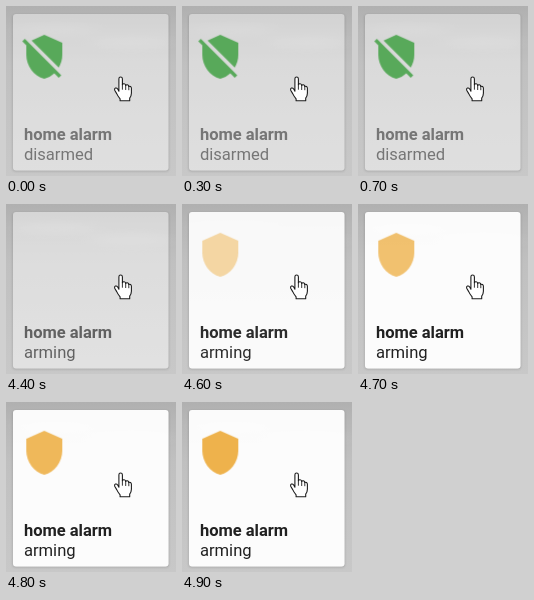
An HTML page that plays this animation: 170x170 px, repeating every 5000 ms.

```html
<!DOCTYPE html>
<html lang="en">
<head>
<meta charset="utf-8">
<title>Home alarm card</title>
<style>
  html, body { margin: 0; width: 100%; height: 100%; overflow: hidden; background: #bbb; }
  svg { display: block; width: 100vw; height: 100vh; }
  text { font-family: Roboto, Arial, sans-serif; font-size: 16.6px; fill: #212121; }
  .title { font-size: 16.5px; font-weight: 700; }

  .panel, .ink, .off, .on, .shield { animation: 5s step-end infinite; }
  .panel { animation-name: panel; }
  .ink { animation-name: ink; }
  .off { animation-name: off; }
  .on { animation-name: on; }
  .shield { animation-name: shield; }

  @keyframes panel {
    0% { fill-opacity: .41; }
    88% { fill-opacity: .45; }
    90% { fill-opacity: .8; }
    92% { fill-opacity: .91; }
    94%, 100% { fill-opacity: .95; }
  }
  @keyframes ink {
    0% { opacity: .55; }
    88% { opacity: .66; }
    90% { opacity: .85; }
    92% { opacity: .95; }
    94%, 100% { opacity: 1; }
  }
  @keyframes off {
    0% { opacity: 1; }
    88%, 100% { opacity: 0; }
  }
  @keyframes on {
    0% { opacity: 0; }
    88%, 100% { opacity: 1; }
  }
  @keyframes shield {
    0% { opacity: 0; }
    90% { opacity: .2; }
    92% { opacity: .5; }
    94% { opacity: .8; }
    96% { opacity: .92; }
    98%, 100% { opacity: 1; }
  }
</style>
</head>
<body>
<svg viewBox="0 0 170 170">
  <defs>
    <linearGradient id="sky" x2="0" y2="1">
      <stop offset="0" stop-color="#b0b0b0"/>
      <stop offset=".12" stop-color="#b7b7b7"/>
      <stop offset=".35" stop-color="#c0c0c0"/>
      <stop offset=".65" stop-color="#c4c4c4"/>
      <stop offset="1" stop-color="#c8c8c8"/>
    </linearGradient>
    <filter id="soft" x="-50%" y="-200%" width="200%" height="500%">
      <feGaussianBlur stdDeviation="9 4"/>
    </filter>
    <filter id="shade" x="-10%" y="-10%" width="120%" height="120%">
      <feGaussianBlur stdDeviation="1.2"/>
    </filter>
  </defs>

  <rect width="170" height="170" fill="url(#sky)"/>
  <g filter="url(#soft)" fill="#d0d0d0" opacity=".4">
    <ellipse cx="50" cy="24" rx="42" ry="4"/>
    <ellipse cx="125" cy="36" rx="40" ry="5"/>
  </g>

  <!-- Shadow stays outside the translucent card -->
  <clipPath id="outside">
    <path clip-rule="evenodd" d="M0 0H170V170H0ZM10 8H159.500Q162.500 8 162.500 11V161.500Q162.500 164.500 159.500 164.500H10Q7 164.500 7 161.500V11Q7 8 10 8Z"/>
  </clipPath>
  <g clip-path="url(#outside)">
    <rect x="6.500" y="8.500" width="156.500" height="157" rx="3" opacity=".14" filter="url(#shade)"/>
  </g>
  <rect class="panel" x="7" y="8" width="155.500" height="156.500" rx="3" fill="#fff"/>

  <g transform="translate(14.300 26.800) scale(2)">
    <path class="off" fill="#58a95a" d="M1 4.270L2.280 3 20.500 21.220 19.230 22.500 17 20.250C15.570 21.570 13.870 22.540 12 23 6.840 21.740 3 16.550 3 11V6.270ZM12 1L21 5V11C21 13.280 20.350 15.500 19.230 17.400L5.650 3.820Z"/>
    <path class="shield" fill="#eeb24c" d="M12 1L3 5V11C3 16.550 6.840 21.740 12 23 17.160 21.740 21 16.550 21 11V5Z"/>
  </g>

  <g class="ink">
    <text class="title" x="17.900" y="134">home alarm</text>
    <text class="off" x="17.900" y="154">disarmed</text>
    <text class="on" x="17.900" y="154">arming</text>
  </g>

  <g transform="translate(-.600 .300)" fill="#fff" stroke="#1c1c1c" stroke-width="1.100" stroke-linejoin="round" stroke-linecap="round">
    <path d="M113.500 85V72.500Q113.500 70.700 115.200 70.700T117 72.500V78.500Q117.300 77.300 118.700 77.500 120.200 77.700 120.300 79.200 120.700 78.200 122 78.500 123.300 78.800 123.400 80.200 124.200 79.600 125.100 80.200 126 80.800 126 82V87Q126 89.500 124.300 91.800V94.500H114.700V92.500Q112.500 90 111.300 87.300L109.300 84Q108.700 82.500 110 81.800 111.300 81.300 112.300 82.700Z"/>
    <path fill="none" stroke-width=".900" d="M117 78.500V83M120.300 79.200V83.300M123.400 80.200V83.500"/>
  </g>
</svg>
</body>
</html>
```
